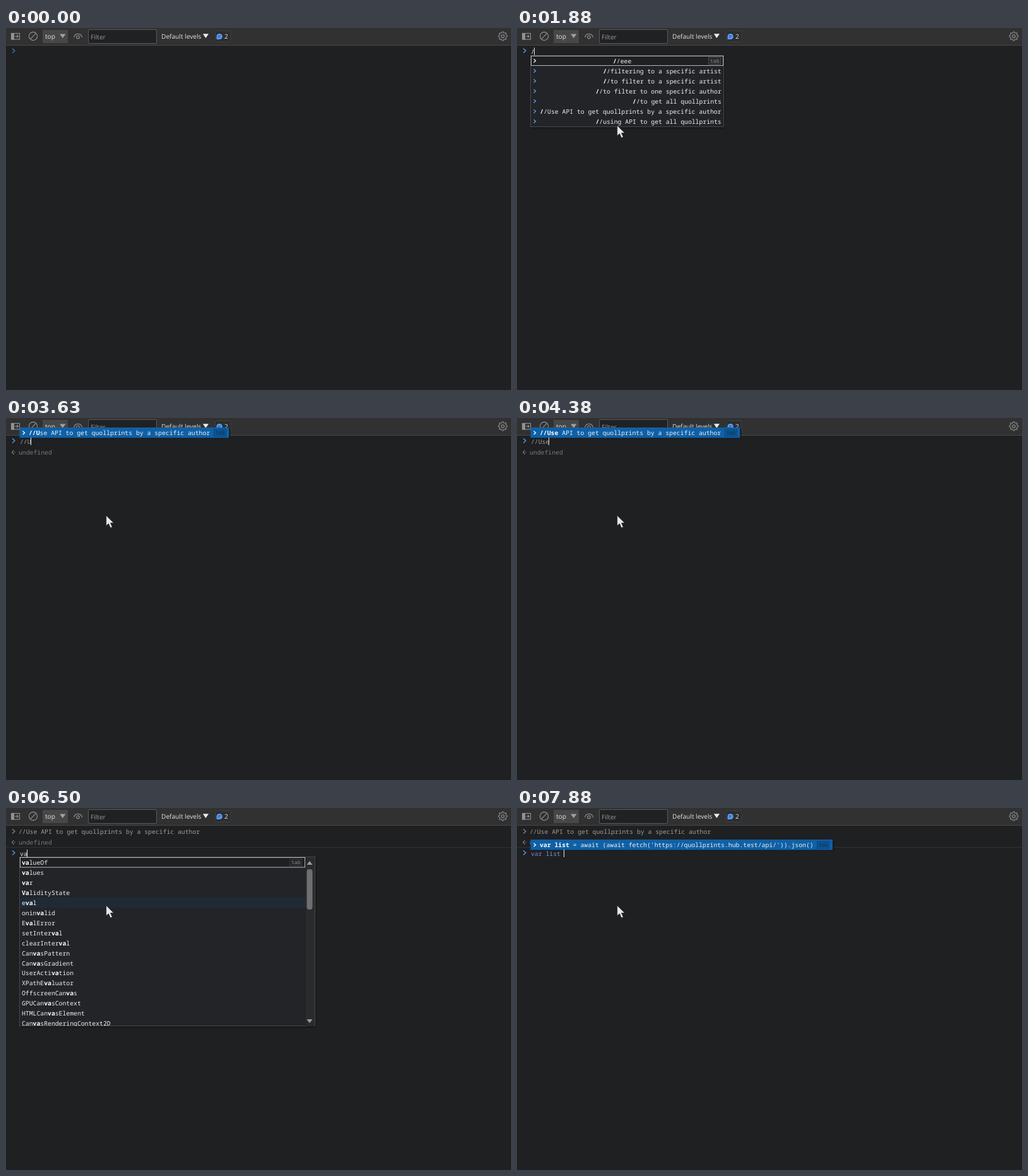
An HTML page for the animation above (8000 ms loop, 800 by 574 pixels).

```html
<!DOCTYPE html>
<html lang="en">
<head>
<meta charset="utf-8">
<title>Console</title>
<style>
  html, body { margin: 0; width: 100%; height: 100%; overflow: hidden; background: #1f2022; }
  svg { display: block; }
  text { white-space: pre; text-rendering: geometricPrecision; }
  .ui { font: 10.15px "Open Sans", "Noto Sans", sans-serif; fill: #e3e3e3; }
  .mono { font: 9.78px "Noto Sans Mono", "DejaVu Sans Mono", monospace; fill: #9b9da0; }
  .row { font-weight: 500; fill: #f0f0f0; }
  .row tspan { font-weight: 700; fill: #fff; }
  .tab { font: 8px "DejaVu Sans Mono", monospace; fill: #85878a; }
  .icon { fill: none; stroke: #929292; stroke-width: 1.1; }
  .chev { fill: none; stroke-width: 1.3; }
</style>
</head>
<body>
<svg width="800" height="574" viewBox="0 0 800 574">
  <rect width="800" height="574" fill="#1f2022"/>
  <rect width="800" height="27" fill="#313132"/>
  <path d="M0 27.5H800" stroke="#47484a"/>

  <g class="icon">
    <rect x="8.5" y="8.5" width="13" height="9.5"/>
    <path d="M9 9h3.5v9h-3.5z" fill="#929292"/>
    <path d="M14 13.2h5M17 11l2.3 2.2L17 15.4"/>
    <circle cx="43" cy="13" r="6.6"/>
    <path d="M38.5 17.7l9-9.4"/>
    <path d="M107.5 15c1.5-7.5 11.500-7.500 13 0"/>
    <circle cx="114" cy="14.500" r="2.300"/>
    <path id="gear"/>
    <circle cx="787" cy="13" r="2.300"/>
  </g>

  <rect x="58" y="3" width="40" height="21" fill="#474748"/>
  <text class="ui" x="62" y="17.300">top</text>
  <path d="M85 9.500h9.500l-4.750 6.500z" fill="#a0a0a0"/>
  <rect x="130.500" y="2.500" width="108" height="22" rx="1.500" fill="#202123" stroke="#5a5b5d"/>
  <text class="ui" x="134" y="17.700" style="fill:#96989b">Filter</text>
  <text class="ui" x="246" y="17.200">Default levels</text>
  <path d="M311.800 9.300h9.200l-4.600 6.700z" fill="#ececec"/>
  <rect x="331.500" y="4.500" width="24.500" height="17.500" rx="2" fill="#2c2d2f" stroke="#3d3e40"/>
  <path d="M333.500 18v-4.500a4.600 4.500 0 1 1 4.600 4.500z" fill="#5a9bf6"/>
  <path d="M335.800 12.500h4.600M335.800 14.600h3" stroke="#24456f" stroke-width=".9"/>
  <text class="ui" x="346" y="17.200">2</text>

  <g id="view"></g>
  <rect id="caret" width="1" height="12" fill="#e8e8e8"/>
  <path id="mouse" d="M158.700 154.500v16.500l3.800-3.400 2.900 6.600 3-1.300-2.900-6.400h5.200z"
        fill="#e8e8e8" stroke="#17181a" stroke-width=".7"/>
</svg>
<script>
const LOOP = 8000, CHAR = 5.87, LEFT = 22;
const $ = id => document.getElementById(id);

const comment = '//Use API to get quollprints by a specific author';
const fetchList = "var list = await (await fetch('https://quollprints.hub.test/api/')).json()";
const comments = [
  '//eee', '//filtering to a specific artist', '//to filter to a specific artist',
  '//to filter to one specific author', '//to get all quollprints', comment,
  '//using API to get all quollprints'
];
const vars = [
  'var e = "100"', "var filterList = list.filter(({author}) => author === 'Mottled Quoll')",
  fetchList, 'var numbers = filterList.map(item => item.number)'
];
const globals = ('valueOf values var ValidityState eval oninvalid EvalError setInterval clearInterval ' +
  'CanvasPattern CanvasGradient UserActivation XPathEvaluator OffscreenCanvas GPUCanvasContext ' +
  'HTMLCanvasElement CanvasRenderingContext2D').split(' ');

const rect = (x, y, w, h, fill, stroke = 'none') =>
  `<rect x="${x}" y="${y}" width="${w}" height="${h}" fill="${fill}" stroke="${stroke}"/>`;
const text = (x, y, s, cls = '', attrs = '') => `<text class="mono ${cls}" x="${x}" y="${y}" ${attrs}>${s}</text>`;
const chevron = (x, y, color, r = 3.6) =>
  `<path class="chev" d="M${x} ${y - r}l${r + .4} ${r}l${-r - .4} ${r}" stroke="${color}"/>`;
const tab = (x, y, fill, stroke, ink) =>
  rect(x + .5, y - 5.5, 19, 11, fill, stroke) + `<text class="tab" x="${x + 3}" y="${y + 2.500}" style="fill:${ink}">tab</text>`;

function mark(s, query) {
  const i = s.toLowerCase().indexOf(query.toLowerCase()), end = i + query.length;
  return s.slice(0, i) + `<tspan>${s.slice(i, end)}</tspan>` + s.slice(end);
}

// Box with its shadow
const panel = (y, w, h) =>
  rect(LEFT + 1, y + 2, w + 1, h + 1, '#15161799') + rect(LEFT - .5, y - .5, w, h, '#222428', '#45474a');

// History suggestions, aligned to the right
function history(y, w, rows, query, firstX) {
  const right = LEFT + w - 4;
  return panel(y, w, rows.length * 16 + 1) +
    rect(LEFT + .5, y + .5, w - 2, 15, '#1f2022', '#b5b6b8') +
    rows.map((s, i) => {
      const mid = y + 8 + i * 16;
      return chevron(26.500, mid, i ? '#5e9bf0' : '#f0f0f0', 2.700) + (i
        ? text(right - s.length * CHAR, mid + 3.500, mark(s, query), 'row')
        : text(firstX, mid + 3.500, mark(s, query), 'row'));
    }).join('') + tab(right - 21, y + 8, '#27292b', '#4a4c4e', '#8d8f92');
}

// The only suggestion left, highlighted
function single(y, s, query) {
  const end = 36 + s.length * CHAR;
  return rect(LEFT + 1, y + 2, end + 9, 16, '#15161799') +
    rect(LEFT - .5, y, end + 8, 16.500, '#0f60a6') +
    chevron(26.500, y + 8.500, '#fff', 2.700) + text(36, y + 12, mark(s, query), 'row') +
    tab(Math.round(end) + 5, y + 8.500, '#0d5492', '#0a477e', '#082f55');
}

function completions(query) {
  const y = 78;
  return panel(y, 468, 268) +
    rect(LEFT, 142, 453, 16, '#202a37') +
    rect(LEFT + .5, y + .5, 451, 15.500, '#1f2022', '#b5b6b8') +
    '<clipPath id="clip"><path d="M22 78h453v268h-453z"/></clipPath><g clip-path="url(#clip)">' +
    globals.map((s, i) => text(25, y + 12 + i * 15.95, mark(s, query), 'row')).join('') + '</g>' +
    tab(449, y + 8.500, '#222427', '#393b3d', '#8d8f92') +
    rect(475, y, 14, 268, '#2a2b2d') +
    '<rect x="476.500" y="97" width="9" height="64" rx="4" fill="#6e6f71"/>' +
    '<path d="M476.500 90h9l-4.500-6zM476.500 335h9l-4.500 6z" fill="#9a9b9d"/>';
}

const result = () => '<path class="chev" d="M12.500 51.500l-3 3 3 3" stroke="#797b7e"/>' +
  '<circle cx="14" cy="54.500" r=".8" fill="#797b7e"/>' + text(20, 57.700, 'undefined', '', 'style="fill:#77797c"');

function colored(s) {
  if (!s.startsWith('var ')) return s;
  return `<tspan fill="#7c86c6">var</tspan><tspan fill="#7699c6">${s.slice(3)}</tspan>`;
}

// Start time, typed text, suggestion box
const steps = [
  [0, ''], [130, ''],
  [1880, '/', q => history(44, 306, comments, q, 152)],
  [2500, '//', q => history(44, 306, comments, q, 152)],
  [3630, '//U', q => single(15, comment, q)],
  [3880, '//Us', q => single(15, comment, q)],
  [4130, '//Use', q => single(15, comment, q)],
  [4500, comment],
  [4880, ''], [5130, ''],
  [6250, 'v', completions], [6380, 'va', completions],
  [6630, 'var', () => history(2, 452, vars, 'var', 202)],
  [6750, 'var ', () => history(2, 452, vars, 'var', 202)],
  [6880, 'var l', () => history(2, 452, vars, 'var', 202)],
  [7000, 'var l', q => single(50, fetchList, q)],
  [7130, 'var li', q => single(50, fetchList, q)],
  [7250, 'var lis', q => single(50, fetchList, q)],
  [7380, 'var list', q => single(50, fetchList, q)],
  [7880, 'var list ', q => single(50, fetchList, q.trim())]
];

function draw([start, typed, popup]) {
  const entered = start >= 4880, y = entered ? 71.500 : 36.500;
  let out = '';
  if (entered) {
    out += chevron(10, 37, '#85878a') + text(20, 41.300, comment) + '<path d="M0 62.500H800" stroke="#303235"/>';
  }
  if (start >= 2500) out += result();
  out += chevron(10, y - .5, start ? '#5c9ae6' : '#3c7ab5');
  const ink = typed.startsWith('//') ? '#9b9da0' : '#dedede';
  out += text(LEFT, y + 4.700, colored(typed), '', `style="fill:${ink}"`);
  if (popup) out += popup(typed);
  $('view').innerHTML = out;
  $('caret').setAttribute('x', Math.floor(LEFT + typed.length * CHAR - .4));
  $('caret').setAttribute('y', y - 5.500);
}

const gear = Array.from({ length: 32 }, (_, i) => {
  const a = (i - .5) * Math.PI / 16, r = i % 4 < 2 ? 7 : 5.400;
  return `${(787 + r * Math.sin(a)).toFixed(2)} ${(13 - r * Math.cos(a)).toFixed(2)}`;
});
$('gear').setAttribute('d', `M${gear.join('L')}Z`);

const origin = performance.now();
let shown;
function tick() {
  const t = (performance.now() - origin) % LOOP;
  const step = steps.findLast(s => s[0] <= t) || steps[0];
  if (step !== shown) draw(shown = step);
  const blink = (t - step[0]) % 1000 < 500;
  $('caret').style.display = step[0] && blink ? '' : 'none';
  $('mouse').style.display = step[0] ? '' : 'none';
  requestAnimationFrame(tick);
}
tick();
</script>
</body>
</html>
```
